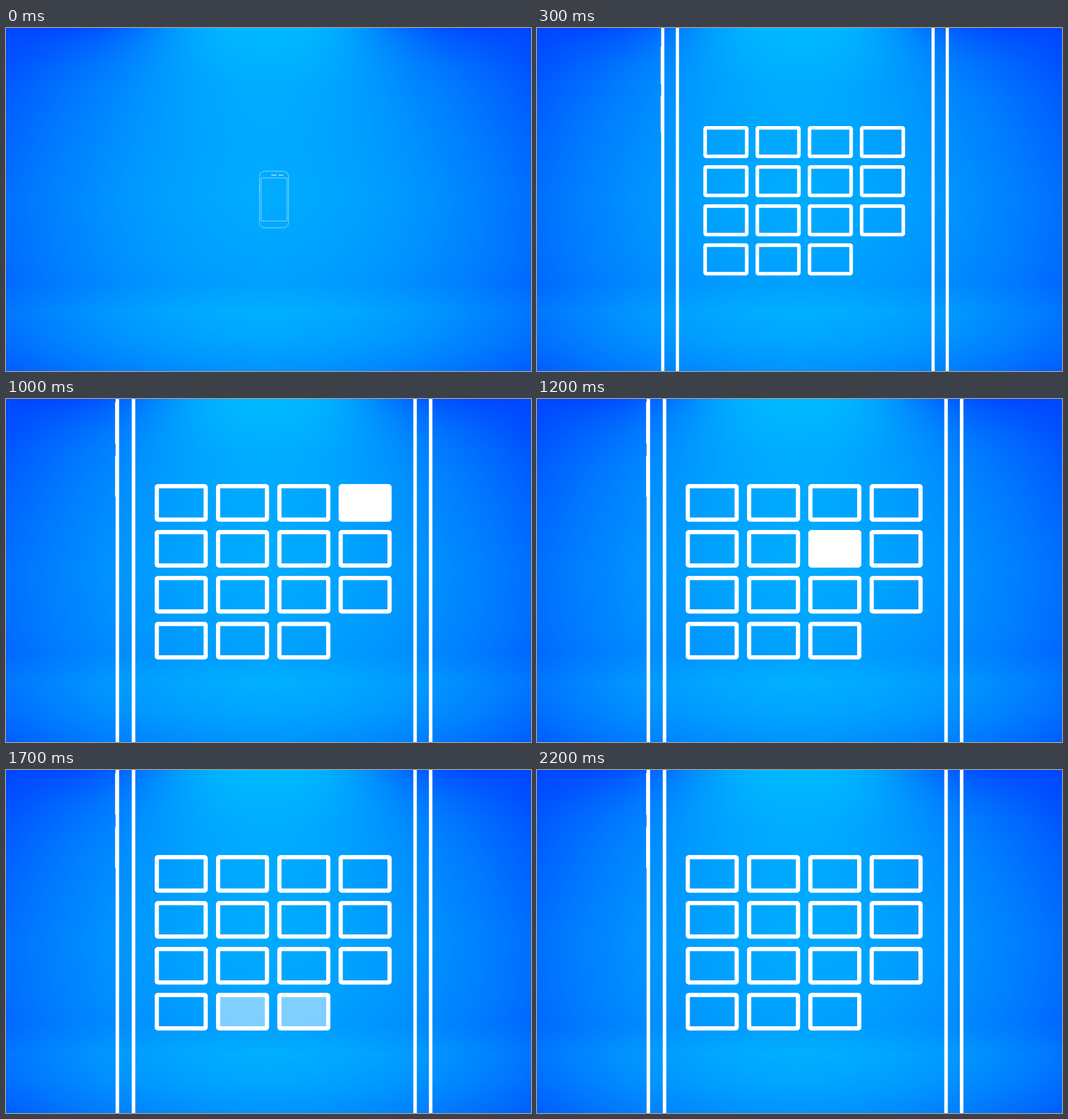
An HTML page with a canvas for the animation above (2.4 s loop, 925 px wide and 605 px high).

```html
<!DOCTYPE html>
<html lang="en">
<head>
<meta charset="utf-8">
<title>Phone keypad</title>
<style>
  html, body { margin: 0; width: 100%; height: 100%; overflow: hidden; background: #00a5ff; }
  canvas { display: block; }
</style>
</head>
<body>
<canvas id="stage" width="925" height="605"></canvas>
<script>
const W = 925, H = 605, LOOP = 2400, STEP = 100, ZOOM = 500;
const ctx = document.getElementById('stage').getContext('2d');

// Green level down the stage: [y, centre, edge]
const levels = [
  [0, 185, 70], [50, 179, 77], [100, 172, 88], [200, 169, 101], [300, 171, 110],
  [400, 165, 108], [450, 160, 103], [500, 175, 117], [550, 166, 109], [605, 147, 92]
];

function levelAt(y) {
  const i = Math.max(1, levels.findIndex(p => p[0] >= y));
  const a = levels[i - 1], b = levels[i];
  const k = (y - a[0]) / (b[0] - a[0]);
  return [a[1] + (b[1] - a[1]) * k, a[2] + (b[2] - a[2]) * k];
}

function makeBackdrop() {
  const canvas = document.createElement('canvas');
  canvas.width = W;
  canvas.height = H;
  const g = canvas.getContext('2d');
  const img = g.createImageData(W, H);
  for (let y = 0, n = 0; y < H; y++) {
    const [centre, edge] = levelAt(y);
    const beam = Math.exp(-y / 65);
    for (let x = 0; x < W; x++, n += 4) {
      const u = Math.abs(x - 460) / 465;
      const wide = 1 - u ** 1.8, narrow = Math.exp(-((u / 0.5) ** 3));
      img.data[n + 1] = edge + (centre - edge) * (wide + (narrow - wide) * beam);
      img.data[n + 2] = img.data[n + 3] = 255;
    }
  }
  g.putImageData(img, 0, 0);

  // Faint scratches on the floor
  let seed = 7;
  const random = () => (seed = seed * 16807 % 2147483647) / 2147483647;
  for (let i = 0; i < 160; i++) {
    const x = random() * W, y = 485 + random() * 120, len = 10 + random() * 40;
    g.strokeStyle = i % 2 ? 'rgba(0,190,255,.06)' : 'rgba(0,90,255,.05)';
    g.beginPath();
    g.moveTo(x, y);
    g.lineTo(x + len, y + (random() - 0.4) * 8);
    g.stroke();
  }
  return canvas;
}

function box(x, y, w, h, r) {
  ctx.beginPath();
  ctx.roundRect(x, y, w, h, r);
}

function zoomed(x, y, scale, draw) {
  ctx.save();
  ctx.translate(x, y);
  ctx.scale(scale, scale);
  draw();
  ctx.restore();
}

function phone() {
  ctx.lineWidth = 6.2;
  box(-276, -541, 552, 1082, 100);
  ctx.stroke();
  box(-247.5, -411, 496, 822, 4);
  ctx.stroke();
  ctx.fillRect(-280, -297, 5, 73);
  ctx.fillRect(-280, -202, 5, 72);
  ctx.fillRect(-52, -471, 98, 11);
  ctx.fillRect(90, -471, 82, 11);
}

// A highlight runs through the keys in reading order
function keys(highlight) {
  ctx.lineWidth = 7.4;
  for (let i = 0; i < 15; i++) {
    box(-205.3 + i % 4 * 108, -150.8 + Math.floor(i / 4) * 81, 86.1, 59.1, 2);
    ctx.globalAlpha = Math.max(0, 1 - Math.abs(highlight - i));
    ctx.fill();
    ctx.globalAlpha = 1;
    ctx.stroke();
  }
}

const backdrop = makeBackdrop();

function frame() {
  const t = Math.floor(performance.now() % LOOP / STEP) * STEP;
  const left = 1 - Math.min(1, t / ZOOM);
  ctx.drawImage(backdrop, 0, 0);
  ctx.strokeStyle = ctx.fillStyle = '#fff';
  zoomed(472.2, 302.5, 1 - 0.9076 * left ** 2.5, phone);
  if (t > 0) zoomed(471, 304.5, 1 - left ** 2.08, () => keys((t - 800) * 0.015));
  requestAnimationFrame(frame);
}
frame();
</script>
</body>
</html>
```
